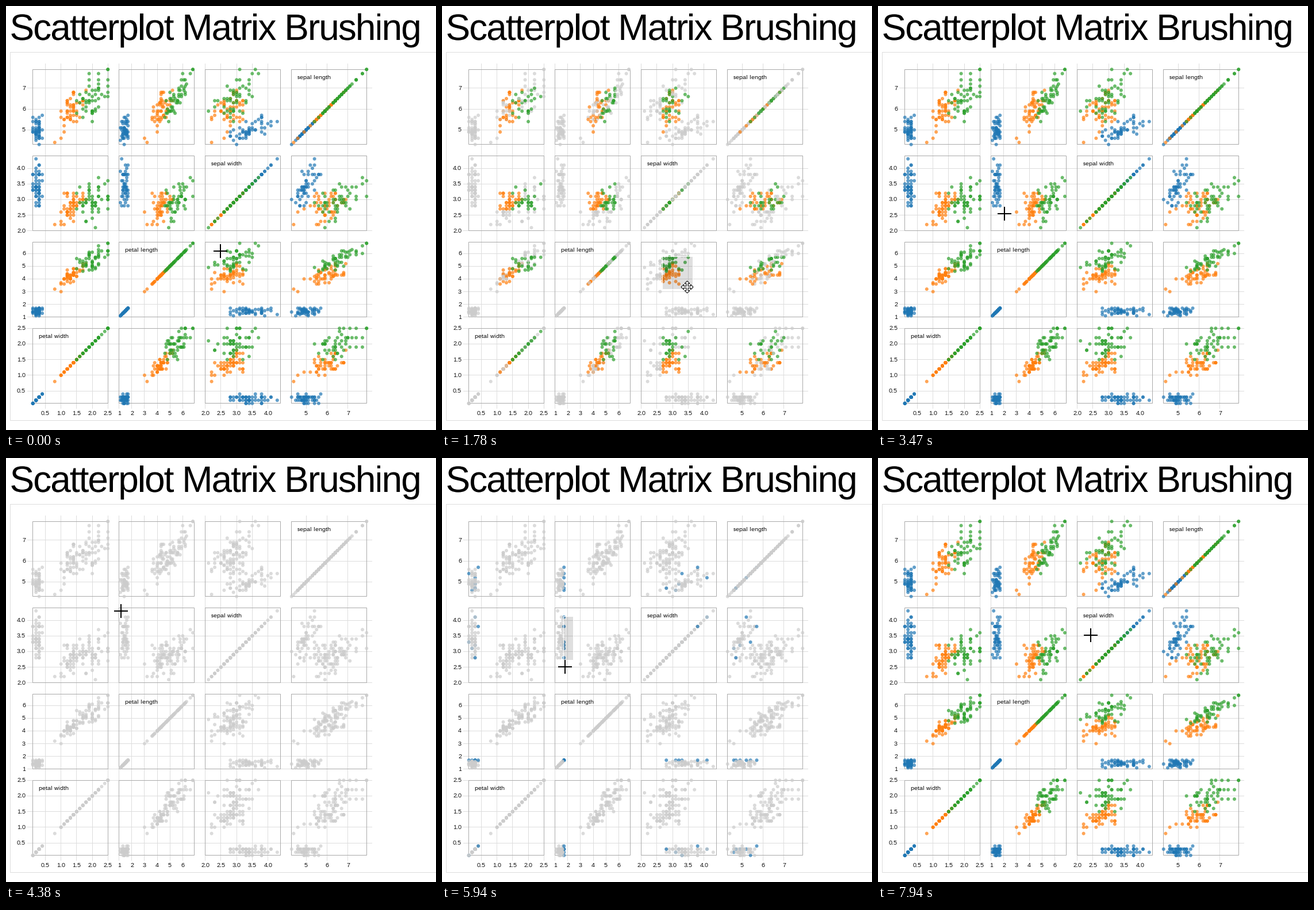
Recreate the animation shown at these times as a matplotlib script. Size 748x737 px, loop 8000 ms.

```python
import numpy as np
import matplotlib as mpl
import matplotlib.pyplot as plt
from matplotlib.animation import FuncAnimation
from matplotlib.collections import LineCollection
from matplotlib.colors import to_rgba
from matplotlib.patches import PathPatch, Polygon, Rectangle
from matplotlib.textpath import TextPath
from matplotlib.transforms import Affine2D

mpl.rcParams.update({"font.family": "Liberation Sans",
                     "text.hinting": "default", "text.hinting_factor": 1})

W, H, DPI = 748, 737, 72          # at 72 dpi one point is one pixel
LOOP, STEP = 8000, 40
CELL, SPAN = 150, 130.5
LEFT, BOTTOM = 46.75, 240.75

# name, domain, tick step; columns run left to right, rows bottom to top
TRAITS = [("petal width", 0.1, 2.5, 0.5), ("petal length", 1.0, 6.9, 1),
          ("sepal width", 2.0, 4.4, 0.5), ("sepal length", 4.3, 7.9, 1)]
LOW, HIGH = np.array([t[1:3] for t in TRAITS]).T

# colour, then mean, deviation and dependence on overall size for each trait
SPECIES = [
    ("#1f77b4", (0.24, 1.46, 3.43, 5.0), (0.1, 0.17, 0.38, 0.35), (0.3, 0.3, 0.85, 0.85)),
    ("#ff7f0e", (1.33, 4.26, 2.77, 5.94), (0.2, 0.47, 0.31, 0.51), (0.86, 0.92, 0.65, 0.76)),
    ("#2ca02c", (2.03, 5.55, 2.97, 6.59), (0.27, 0.55, 0.32, 0.63), (0.4, 0.9, 0.5, 0.94)),
]
PER_SPECIES = 50


def flowers(rng, mean, dev, load):
    """Traits that share one size factor, measured to 0.1."""
    z = rng.standard_normal((PER_SPECIES, 5))
    z = (z - z.mean(0)) / z.std(0)
    load = np.array(load)
    traits = mean + dev * (z[:, :1] * load + z[:, 1:] * np.sqrt(1 - load**2))
    return np.round(np.clip(traits, LOW, HIGH), 1)


def to_x(col, value):
    return LEFT + CELL * col + SPAN * (value - LOW[col]) / (HIGH - LOW)[col]


def to_y(row, value):
    i = 3 - row
    return BOTTOM + CELL * row - SPAN * (value - LOW[i]) / (HIGH - LOW)[i]


rng = np.random.default_rng(7)
data = np.vstack([flowers(rng, *s[1:]) for s in SPECIES])
cells = [(c, r) for c in range(4) for r in range(4)]
spots = {(c, r): np.column_stack([to_x(c, data[:, c]), to_y(r, data[:, 3 - r])])
         for c, r in cells}
base = np.repeat([to_rgba(s[0], 0.7) for s in SPECIES], PER_SPECIES, axis=0)
faded = np.array(to_rgba("#ccc", 0.7))

fig = plt.figure(figsize=(W / DPI, H / DPI), dpi=DPI, facecolor="white")
ax = fig.add_axes([0, 0, 1, 1])
ax.set(xlim=(0, W), ylim=(H, 0))
ax.axis("off")


def draw_title(text, x, y, size, spacing):
    def outline(s):
        return TextPath((0, 0), s, size=size, prop={"family": "Liberation Sans"})

    bars = outline("||").get_extents().width
    for ch in text:
        if ch != " ":
            place = Affine2D().scale(1, -1).translate(x, y)
            ax.add_patch(PathPatch(place.transform_path(outline(ch)), fc="black", lw=0))
        x += outline(f"|{ch}|").get_extents().width - bars + spacing


def box(x, y, w, h, **style):
    return ax.add_patch(Rectangle((x, y), w, h, lw=1, snap=False, **style))


def label(x, y, text, ha):
    ax.text(x, y, text, size=10, ha=ha, va="baseline", color="black", zorder=3)


def crisp(v):
    return np.floor(v) + 0.5


draw_title("Scatterplot Matrix Brushing", 6.5, 59, 64, -2)
box(7.5, 80.5, 800, 640, fc="none", ec="#ddd")

grid = []
for i, (name, low, high, step) in enumerate(TRAITS):
    row = 3 - i
    for v in np.arange(np.ceil(low / step) * step, high + 0.01, step):
        x, y = to_x(i, v), to_y(row, v)
        grid += [[(crisp(x), 100), (crisp(x), 700)], [(37, crisp(y)), (637, crisp(y))]]
        text = f"{v:.1f}" if step < 1 else f"{v:.0f}"
        label(round(x), 711, text, "center")
        label(34, round(y) + 3, text, "right")
    label(57 + CELL * i, 127 + CELL * row, name, "left")
ax.add_collection(LineCollection(grid, colors="#ddd", linewidths=1, zorder=1, snap=False))
for c, r in cells:
    box(46.5 + CELL * c, 110.5 + CELL * r, 131, 130, fc="none", ec="#aaa", zorder=1.5)

dots = ax.scatter(*np.vstack([spots[k] for k in cells]).T, s=36, lw=0,
                  c=np.tile(base, (16, 1)), zorder=2)
extent = box(0, 0, 1, 1, fc=(0, 0, 0, 0.125), ec="white", zorder=4)

# Pointers: a crosshair, and a four-way arrow over the brushed area
cross, = ax.plot([], [], color="black", lw=2, solid_capstyle="butt", zorder=6)
CROSS = np.array([(-12, 0), (12, 0), (np.nan, np.nan), (0, -12), (0, 12)])
HEAD = np.array([(-1.5, -1.5), (-1.5, -6), (-4.5, -6), (0, -10.5)])
ARM = np.vstack([HEAD, HEAD[-2::-1] * (-1, 1)])
ARROWS = np.vstack([Affine2D().rotate_deg(90 * k).transform(ARM) for k in range(4)])
arrows = ax.add_patch(Polygon(ARROWS, fc="white", ec="black", lw=1, zorder=6))

# Pointer moves: begin, end, where to
START = (373, 426)
MOVES = [(60, 1170, (426, 488)), (1780, 2140, (404, 508)), (3110, 3470, (219, 361)),
         (3470, 4070, (200, 266)), (4380, 5160, (219, 341)), (5400, 5940, (214, 363)),
         (6680, 7460, (411, 301)), (7520, 7920, (370, 308))]
# Brushes: cell, press, end of drag, clearing press, release, first and last corner
BRUSHES = [((2, 2), 60, 1500, 2380, 2560, (384, 436), (437, 493)),
           ((1, 1), 4380, 5400, 6500, 6680, (212, 276), (229, 352))]


def glide(t, begin, end, a, b):
    """Ease out from point a to point b."""
    u = np.clip((t - begin) / (end - begin), 0, 1)
    return np.array(a) + np.subtract(b, a) * (1 - (1 - u) ** 1.65)


def pointer(t):
    spot = START
    for begin, end, goal in MOVES:
        spot = glide(t, begin, end, spot, goal)
    return np.round(spot)


def update(i):
    t = (i + 0.5) * STEP
    colors = base
    extent.set_visible(False)
    for cell, press, end, clear, release, first, last in BRUSHES:
        if not press <= t < release:
            continue
        corner = glide(t, press, end, first, last)
        picked = np.zeros(len(data), bool)
        if t < clear and np.all(corner > first):
            p = spots[cell]
            picked = np.all((p >= first) & (p <= corner), axis=1)
            extent.set_bounds(first[0] - 0.5, first[1] - 0.5, *np.round(corner - first))
            extent.set_visible(True)
        colors = np.where(picked[:, None], base, faded)
    dots.set_facecolors(np.tile(colors, (16, 1)))

    spot = pointer(t)
    moving = 1600 <= t < 1900
    cross.set_visible(not moving)
    arrows.set_visible(moving)
    cross.set_data(*(CROSS + spot).T)
    arrows.set_xy(ARROWS + spot + 0.5)
    return dots, extent, cross, arrows


anim = FuncAnimation(fig, update, frames=LOOP // STEP, interval=STEP,
                     repeat=True, repeat_delay=0, blit=False)
plt.show()
```
